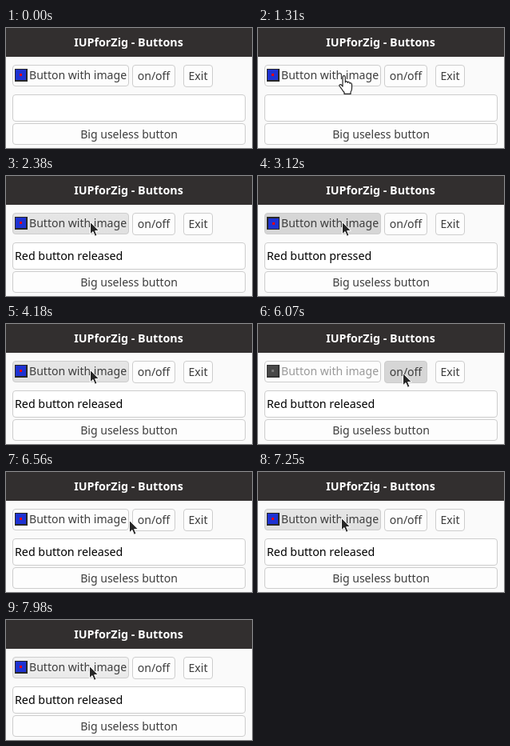
An HTML page for the animation above (8 s loop, 308 px wide and 150 px high).

```html
<!DOCTYPE html>
<html lang="en">
<head>
<meta charset="utf-8">
<title>Buttons</title>
<style>
html, body { margin: 0; width: 100%; height: 100%; overflow: hidden; background: #fafafa; }
svg { display: block; width: 308px; height: 150px; }
text { font: 14.05px "Noto Sans", "Open Sans", sans-serif; fill: #3d3d3d; }
.title { font-weight: 700; font-size: 14.3px; fill: #fff; }
.entry { font-size: 14.25px; fill: #000; }
.box { fill: #fdfdfd; stroke: #cdcdcd; }
</style>
</head>
<body>
<svg viewBox="0 0 308 150">
  <defs>
    <linearGradient id="imageFill" x2="0" y2="1"><stop/><stop offset="1"/></linearGradient>
    <linearGradient id="toggleFill" x2="0" y2="1"><stop/><stop offset="1"/></linearGradient>
  </defs>
  <rect width="308" height="150" fill="#fafafa"/>
  <rect width="308" height="36" fill="#322f2f"/>
  <text class="title" x="153.5" y="23" text-anchor="middle">IUPforZig - Buttons</text>

  <rect class="box" x="8.5" y="46.5" width="145" height="26" rx="3.5" style="fill:url(#imageFill)"/>
  <g id="icon" shape-rendering="crispEdges">
    <rect id="frame" x="11" y="51" width="16" height="16"/>
    <rect id="face" width="13" height="13"/>
    <rect id="dot" width="3" height="3"/>
  </g>
  <text id="label" x="29" y="64">Button with image</text>

  <rect class="box" x="158.5" y="46.5" width="53" height="27" rx="3.5" style="fill:url(#toggleFill)"/>
  <text x="185" y="65" text-anchor="middle">on/off</text>
  <rect class="box" x="222.5" y="46.5" width="36" height="27" rx="3.5"/>
  <text x="240.5" y="65" text-anchor="middle">Exit</text>

  <rect class="box" x="8.5" y="83.5" width="291" height="33" rx="3.5" style="fill:#fff"/>
  <text id="entry" class="entry" x="11" y="105"></text>
  <rect class="box" x="8.5" y="119.5" width="291" height="26" rx="3.5"/>
  <text x="154" y="138" text-anchor="middle">Big useless button</text>

  <path id="hand" fill="#fff" stroke="#222" stroke-width="1.2" stroke-linejoin="round"
    d="M5 14V2.5Q5 .6 6.6 .6T8.3 2.5V9Q8.5 7.6 9.8 7.7T11.2 9.4Q11.5 8.3 12.7 8.5T14 10.3Q14.3 9.5 15.3 9.8T16.5 11.6V16Q16.5 19 15 21V23.4H7V21.5Q5 19.5 3.5 16.8L1 13.5Q.4 12.2 1.6 11.7T3.6 12.3Z"/>
  <path id="arrow" fill="#262626" stroke="#fff" stroke-width="1" stroke-linejoin="round"
    d="M.5 .5V15.8L4 12.5L6.4 18.3L9 17.2L6.6 11.6H11.4Z"/>
</svg>
<script>
const LOOP = 8000, REFRESH = 73, FADE = 140;
const $ = id => document.getElementById(id);

// Time spans of hovering and pressing
const image = {
  hover: [[1540, 4400], [6570, LOOP]],
  press: [[2220, 2380], [2980, 3510], [3890, 4180], [7010, 7250], [7530, 7920]]
};
const toggle = { hover: [[4560, 6430]], press: [[5070, 5310], [6000, 6210]] };

// Cursor stops: time, x, y
const handPath = [[140, 265, 129], [440, 222, 74], [507, 222, 74], [1090, 102, 60], [1310, 101, 59]];
const arrowPath = [[1540, 105, 57], [4330, 105, 57], [4700, 181, 61], [6350, 181, 61], [6720, 104, 57]];

const mix = (a, b, k) => a + (b - a) * k;
const ease = k => k * k * (3 - 2 * k);
const within = (spans, t) => spans.some(([a, b]) => t >= a && t < b);

// A change shows half done at once, then fades to the end
const fade = (t, from) => t < from ? 0 : Math.min(1, .5 + (t - from) / FADE);
const level = (spans, t) => spans.reduce((sum, [a, b]) => sum + fade(t, a) - fade(t, b), 0);

function shade(id, { hover, press }, t) {
  const h = level(hover, t), p = level(press, t);
  [245, 234].forEach((lit, n) => {
    const g = Math.round(mix(mix(253, lit, h), 214, p));
    $(id).children[n].setAttribute("stop-color", `rgb(${g},${g},${g})`);
  });
}

function position(path, t) {
  const i = path.findIndex(stop => stop[0] > t);
  if (i < 1) return path.at(i).slice(1);
  const [t0, x0, y0] = path[i - 1], [t1, x1, y1] = path[i];
  const steps = Math.round((t1 - t0) / REFRESH);
  const k = ease(Math.floor(steps * (t - t0) / (t1 - t0)) / steps);
  return [mix(x0, x1, k), mix(y0, y1, k)];
}

function place(id, shown, path, t) {
  $(id).style.display = shown ? "" : "none";
  $(id).setAttribute("transform", `translate(${position(path, t).map(Math.round)})`);
}

function paintIcon(down, off) {
  const colors = { frame: off ? "#333" : "#282828", face: off ? "#484848" : "#1e32d2", dot: off ? "#777" : "#f00000" };
  for (const id in colors) $(id).setAttribute("fill", colors[id]);
  const shift = down ? `translate(13 53)` : `translate(12 52)`;
  $("face").setAttribute("transform", shift);
  $("dot").setAttribute("transform", `${shift} translate(5 5)`);
}

function draw(t) {
  const down = within(image.press, t);
  const off = t >= toggle.press[0][1] && t < toggle.press[1][1];
  shade("imageFill", image, t);
  shade("toggleFill", toggle, t);
  paintIcon(down, off);
  $("label").style.fill = off ? "#999" : "";
  $("entry").textContent = t < image.press[0][0] ? "" : `Red button ${down ? "pressed" : "released"}`;
  place("hand", t >= 140 && t < 1540, handPath, t);
  place("arrow", t >= 1540, arrowPath, t);
}

const start = performance.now();
function frame() {
  draw((performance.now() - start) % LOOP);
  requestAnimationFrame(frame);
}
frame();
</script>
</body>
</html>
```
